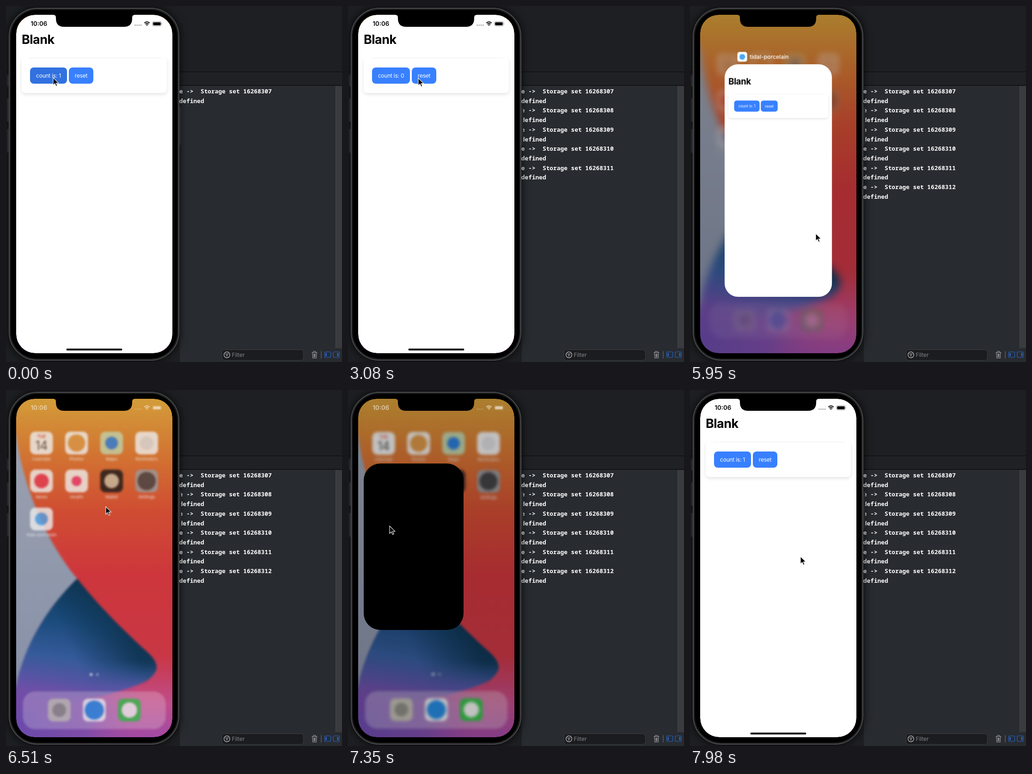
Animation, 727 px wide and 770 px high, one loop 8000 ms. Source, as an HTML page:

```html
<!DOCTYPE html>
<html lang="en">
<head>
<meta charset="utf-8">
<title>Counter app</title>
<style>
html, body { margin: 0; width: 100%; height: 100%; overflow: hidden; background: #1e1f22; }
#stage { position: relative; width: 727px; height: 770px; overflow: hidden; font-family: Inter, sans-serif; }
#stage div, #stage > svg, .screen svg { position: absolute; }
.anim { animation: 8s linear infinite; }
.step { animation: 8s step-end infinite; }

/* Editor behind the phone */
.console { left: 376px; top: 173px; width: 351px; height: 597px; background: #282b30; }
.tabs { left: 0; top: 142px; width: 727px; height: 28px; background: #202125; border: solid #08090a; border-width: 1.5px 0; }
.scrollbar { left: 713px; top: 173px; width: 14px; height: 567px; background: #3a3b3e; border-left: 1px solid #46474a; box-sizing: border-box; }
#log { left: 374.8px; top: 174px; width: 330px; overflow: hidden; white-space: pre; color: #fff;
  font: bold 12.83px/20.7px "Noto Sans Mono", monospace; animation-name: log; }
@keyframes log {
  0% { height: 41.4px; } 7% { height: 82.8px; } 13% { height: 124.2px; }
  19.25% { height: 165.6px; } 34% { height: 207px; } 48%, 100% { height: 248.4px; }
}

/* Phone */
.side { background: #3a3b3e; width: 4px; }
.phone { left: 6px; top: 4px; width: 369px; height: 763px; box-sizing: border-box; border-radius: 62px;
  background: #000; border: 2px solid #4b4c4e; box-shadow: 0 0 16px 4px rgba(0,0,0,.55), inset 0 0 0 2.5px #1b1b1d; }
.screen { left: 22px; top: 19px; width: 338px; height: 732px; border-radius: 40px; overflow: hidden; background: #000; }
.screen svg { left: 0; top: 0; width: 338px; height: 732px; overflow: visible; }

#wall { animation-name: wall; }
@keyframes wall {
  0%, 65% { filter: blur(9px) brightness(.52); }
  70%, 78.5% { filter: blur(9px) brightness(.75); }
  82.5%, 90% { filter: blur(0) brightness(1); }
  91.875% { filter: blur(2.5px) brightness(.76); }
  94.5%, 100% { filter: blur(9px) brightness(.6); }
}
#home { transform-origin: center; animation-name: home; }
@keyframes home {
  0%, 65% { opacity: 0; filter: blur(7px) brightness(.75); transform: scale(.945); }
  70%, 78.5% { opacity: .3; filter: blur(7px) brightness(.75); transform: scale(.945); }
  82.5%, 90% { opacity: 1; filter: blur(0) brightness(1); transform: none; }
  91.875% { opacity: 1; filter: blur(3px) brightness(.76); transform: scale(.982); }
  94.5%, 100% { opacity: .5; filter: blur(7px) brightness(.6); transform: scale(.95); }
}
#homeStatus { color: #fff; animation-name: homeStatus; }
@keyframes homeStatus {
  0%, 79.5% { opacity: 0; } 82.5%, 90% { opacity: .9; }
  91.875%, 95.5% { opacity: .6; } 97%, 100% { opacity: 0; }
}
#splash { background: #000; animation-name: splash; }
@keyframes splash {
  0%, 90% { left: 28px; top: 233px; width: 50px; height: 50px; border-radius: 12px; opacity: 0; }
  90.5% { opacity: 1; }
  91.875% { left: 12px; top: 141px; width: 215px; height: 358px; border-radius: 36px; }
  94.5%, 100% { left: 0; top: 0; width: 338px; height: 732px; border-radius: 40px; opacity: 1; }
}

/* App window */
#card { inset: 0; animation-name: card; }
@keyframes card {
  0%, 63.8% { transform: none; opacity: 1; }
  64.75% { transform: translateY(-2.5px) scale(.985); }
  67.5% { transform: translateY(-6px) scale(.76); }
  70%, 75.2% { transform: translateY(-7.5px) scale(.687); }
  79% { transform: translateY(-680px) scale(.687); opacity: 1; }
  79.01% { transform: translateY(-680px) scale(.687); opacity: 0; }
  79.02%, 95.2% { transform: none; opacity: 0; }
  97%, 100% { transform: none; opacity: 1; }
}
.app { inset: 0; background: #fff; border-radius: 42px; overflow: hidden; }
.chrome { color: #000; animation-name: chrome; }
@keyframes chrome { 0%, 65% { opacity: 1; } 69%, 79% { opacity: 0; } 80%, 100% { opacity: 1; } }
.title { left: 12px; top: 36px; font: 700 27px/36px Inter, sans-serif; letter-spacing: -.02em; color: #000; }
.content { left: 0; top: 93px; width: 338px; height: 140px; overflow: hidden; }
.panel { left: 12px; top: 0; width: 314px; height: 76px; border-radius: 8px; box-shadow: 0 3px 8px rgba(0,0,0,.11); }
.rule { left: 28px; top: 0; width: 286px; height: 1px; background: #efefef; }
.buttons { left: 30px; top: 21px; display: flex; gap: 4px; }
#stage .button { position: relative; height: 35px; border-radius: 8px; overflow: hidden; background: #3880ff; color: #fff;
  font: 400 12px/35px Inter, sans-serif; letter-spacing: -.02em; text-align: center; white-space: nowrap; }
#count { animation-name: countWidth, countPress; }
@keyframes countWidth { 0% { width: 80px; } 7% { width: 82px; } 48%, 100% { width: 80px; } }
@keyframes countPress {
  0%, 6.5%, 12.5%, 18.7%, 47.5% { background: #3171e0; }
  2.6%, 8.8%, 14.8%, 21%, 49.8%, 100% { background: #3880ff; }
}
#reset { width: 53px; animation-name: resetPress; }
@keyframes resetPress { 0% { background: #3880ff; } 33.5% { background: #3171e0; } 35.8%, 100% { background: #3880ff; } }
#reel { width: 100%; left: 0; top: 0; animation-name: reel; }
@keyframes reel {
  0% { transform: none; } 7% { transform: translateY(-35px); } 13% { transform: translateY(-70px); }
  19.25% { transform: translateY(-105px); } 34% { transform: translateY(-140px); } 48%, 100% { transform: none; }
}
.label { left: 40px; top: -39px; height: 31px; animation-name: label; }
.label i { position: absolute; width: 31px; height: 31px; border-radius: 7px;
  background: radial-gradient(circle, #4aa8f5 8.5px, #f4f8fc 9px); }
.label span { position: absolute; left: 38.6px; font: 500 17.8px/31px Inter, sans-serif; color: #fff; white-space: nowrap; }
@keyframes label { 0%, 67% { opacity: 0; } 71%, 79% { opacity: 1; } 79.5%, 100% { opacity: 0; } }

#cursor { left: 0; top: 0; width: 14px; height: 21px; overflow: visible; animation-name: cursor; }
@keyframes cursor {
  0%, 22% { transform: translate(102px, 155px); }
  28%, 39% { transform: translate(152px, 156px); }
  45%, 51% { transform: translate(104px, 154px); }
  59%, 62.8% { transform: translate(150px, 742px); }
  64.75% { transform: translate(157px, 621px); }
  67.5% { transform: translate(190px, 470px); }
  70% { transform: translate(225px, 455px); }
  74.375%, 75% { transform: translate(272px, 492px); }
  78.2% { transform: translate(250px, 235px); }
  80.5% { transform: translate(228px, 240px); }
  85.75% { transform: translate(156px, 313px); }
  88.5%, 91.875% { transform: translate(90px, 294px); }
  93% { transform: translate(94px, 296px); }
  98.5%, 100% { transform: translate(239px, 360px); }
}
</style>
</head>
<body>
<div id="stage">
  <div class="tabs"></div>
  <div class="console"></div>
  <div class="scrollbar"></div>
  <div id="log" class="step"></div>

  <svg width="727" height="770" fill="none">
    <rect x="467.5" y="743.5" width="176" height="23" rx="6" fill="#1b1c1f" stroke="#3b3c40"/>
    <g stroke="#c9c9cb" stroke-width="1.2">
      <circle cx="478" cy="754.5" r="6.3"/>
      <path d="M474.5 752.5h7M475.8 755h4.4M477 757.4h2"/>
    </g>
    <text x="488.5" y="759" font-size="11.8" fill="#85868a">Filter</text>
    <g stroke="#9b9c9f" stroke-width="1.1">
      <path d="M661.5 749.5h12M665 749v-2h5v2M663 750l.8 11.5h7.4l.8-11.5M665.8 752l.3 7.5M667.5 752v7.5M669.2 752l-.3 7.5"/>
      <path d="M682 746.5v16" stroke="#6c6d70"/>
    </g>
    <g stroke="#2864c0" stroke-width="1.2">
      <rect x="689.5" y="748" width="13" height="12" rx="2"/><rect x="708" y="748" width="13" height="12" rx="2"/>
      <path d="M692.7 750.5v7M717.8 750.5v7" stroke-width="2.6"/>
    </g>
  </svg>

  <div class="side" style="left:2px;top:150px;height:24px"></div>
  <div class="side" style="left:2px;top:200px;height:50px"></div>
  <div class="side" style="left:2px;top:266px;height:51px"></div>
  <div class="side" style="left:375px;top:218px;height:82px"></div>
  <div class="phone"></div>

  <div class="screen">
    <svg id="wall" class="anim" viewBox="22 19 338 732">
      <defs>
        <linearGradient id="sunset" gradientUnits="userSpaceOnUse" x1="0" y1="19" x2="0" y2="751">
          <stop offset="0" stop-color="#e3a83d"/><stop offset=".17" stop-color="#e27b36"/>
          <stop offset=".33" stop-color="#df5336"/><stop offset=".52" stop-color="#dc3a40"/>
          <stop offset=".76" stop-color="#d83b4a"/><stop offset=".9" stop-color="#cf5295"/>
          <stop offset="1" stop-color="#ae50b0"/>
        </linearGradient>
        <linearGradient id="mist" x1="0" y1="0" x2="0" y2="1">
          <stop offset="0" stop-color="#a9afbd"/><stop offset="1" stop-color="#8e99b4"/>
        </linearGradient>
        <linearGradient id="sea" gradientUnits="userSpaceOnUse" x1="200" y1="430" x2="160" y2="695">
          <stop offset="0" stop-color="#123f63"/><stop offset=".3" stop-color="#1d5085"/>
          <stop offset=".6" stop-color="#3a62a6"/><stop offset=".8" stop-color="#6159b0"/>
          <stop offset="1" stop-color="#7b56b6" stop-opacity="0"/>
        </linearGradient>
        <linearGradient id="shade" gradientUnits="userSpaceOnUse" x1="150" y1="580" x2="270" y2="530">
          <stop offset="0" stop-color="#0d3552" stop-opacity="0"/><stop offset="1" stop-color="#0d3552" stop-opacity=".85"/>
        </linearGradient>
        <linearGradient id="fade" gradientUnits="userSpaceOnUse" x1="0" y1="585" x2="0" y2="640">
          <stop offset="0" stop-color="#fff"/><stop offset="1"/>
        </linearGradient>
        <mask id="upper"><rect y="350" width="400" height="400" fill="url(#fade)"/></mask>
        <radialGradient id="violet" gradientUnits="userSpaceOnUse" cx="40" cy="720" r="270">
          <stop offset="0" stop-color="#7350b8"/><stop offset=".5" stop-color="#8353b6" stop-opacity=".9"/>
          <stop offset="1" stop-color="#b850a8" stop-opacity="0"/>
        </radialGradient>
      </defs>
      <rect x="-30" y="-30" width="440" height="840" fill="url(#sunset)"/>
      <rect x="-30" y="440" width="440" height="370" fill="url(#violet)"/>
      <path d="M-20 20L22 98C38 215 90 332 154 408C90 470 40 550 22 640L-20 720Z" fill="url(#mist)"/>
      <g id="wave">
        <path id="wavePath" d="M154 408C205 473 265 530 305 566C325 584 329 598 324 608C315 632 270 645 200 664C130 682 70 694 -20 700V720L22 640C40 550 90 470 154 408Z" fill="url(#sea)"/>
        <use href="#wavePath" style="display:none"/>
        <path d="M154 408C205 473 265 530 305 566C325 584 329 598 324 608L300 640H22V640C40 550 90 470 154 408Z" fill="url(#shade)" mask="url(#upper)"/>
      </g>
    </svg>

    <svg id="home" class="anim" viewBox="22 19 338 732" text-anchor="middle">
      <rect x="34" y="656" width="314" height="83" rx="27" fill="#fff" opacity=".3"/>
      <circle cx="184" cy="619" r="3" fill="#fff"/><circle cx="198" cy="619" r="3" fill="#fff" opacity=".5"/>
      <g id="icons"></g>
      <text x="75" y="99" font-size="9.5" font-weight="600" fill="#d8392f">TUE</text>
      <text x="74.5" y="126" font-size="28" font-weight="300" letter-spacing="-1" fill="#222">14</text>
    </svg>

    <div id="splash" class="anim"></div>
    <svg id="homeStatus" class="anim" viewBox="22 19 338 732"><use href="#status"/></svg>

    <div id="card" class="anim">
      <div class="label anim"><i></i><span>tidal-porcelain</span></div>
      <div class="app">
        <svg class="chrome anim" viewBox="22 19 338 732">
          <g id="status" fill="currentColor">
            <text x="53.5" y="43" font-size="13.2" font-weight="600">10:06</text>
            <g opacity=".35"><circle cx="279.5" cy="41.5" r="1.4"/><circle cx="283.7" cy="41.5" r="1.4"/><circle cx="287.9" cy="41.5" r="1.4"/><circle cx="292.1" cy="41.5" r="1.4"/></g>
            <path d="M299.3 36.8Q305 31.6 310.7 36.8M301.5 39.2Q305 36.2 308.5 39.2" fill="none" stroke="currentColor" stroke-width="1.9"/>
            <path d="M303 40.8Q305 39.4 307 40.8L305 43Z"/>
            <rect x="316.7" y="33.7" width="19.6" height="9.6" rx="3" fill="none" stroke="currentColor" stroke-opacity=".4"/>
            <rect x="318.2" y="35.2" width="16.6" height="6.6" rx="1.7"/>
            <path d="M337.4 36.8q1.6 1.7 0 3.4z" opacity=".5"/>
          </g>
          <rect x="130.5" y="741" width="121" height="4" rx="2"/>
        </svg>
        <div class="title">Blank</div>
        <div class="content">
          <div class="panel"></div>
          <div class="rule"></div>
          <div class="buttons">
            <div id="count" class="button step"><div id="reel" class="step"></div></div>
            <div id="reset" class="button step">reset</div>
          </div>
        </div>
      </div>
    </div>
  </div>

  <svg width="727" height="60"><path d="M102 18V19Q108 19 108 25V27Q108 45 126 45H255Q273 45 273 27V25Q273 19 279 19V18Z"/></svg>
  <svg id="cursor" class="anim" viewBox="0 0 14 21">
    <path d="M0 0V16.2L3.8 12.7L6.4 18.6L9 17.5L6.4 11.7H11.6Z" stroke="#fff" stroke-width="1.1"/>
  </svg>
</div>
<script>
const byId = id => document.getElementById(id);

byId('log').textContent = Array.from({ length: 6 },
  (_, i) => `e ->  Storage set ${16268307 + i}\ndefined`).join('\n');

byId('reel').innerHTML = [1, 2, 3, 4, 0].map(n => `count is: ${n}<br>`).join('');

// name, tile colour, mark colour, mark radius
const apps = [
  ['Calendar', '#fff'],
  ['Photos', '#fff', '#e8a04c', 19],
  ['Maps', '#cfe0b4', '#2f86e8', 14],
  ['Reminders', '#fff', '#e9e9ec', 15],
  ['News', '#fff', '#f2405c', 16],
  ['Health', '#fff', '#f8447c', 11],
  ['Wallet', '#1c1c1e', '#d3c8ae', 16],
  ['Settings', '#a4a5a9', '#47484c', 20],
  ['tidal-porcelain', '#fff', '#55b0fa', 14]
];
const dock = [['', '#cdcabf', '#98968d', 15], ['', '#fff', '#2a94ee', 21], ['', '#3acb4e', '#fff', 17]];

const icon = ([name, tile, mark, r], x, y) => `
  <rect x="${x - 25}" y="${y - 25}" width="50" height="50" rx="11.5" fill="${tile}"/>
  ${mark ? `<circle cx="${x}" cy="${y}" r="${r}" fill="${mark}"/>` : ''}
  <text x="${x}" y="${y + 38.5}" font-size="9.6" font-weight="500" fill="#fff">${name}</text>`;

byId('icons').innerHTML =
  apps.map((app, i) => icon(app, 75 + i % 4 * 77, 110.5 + Math.floor(i / 4) * 83.4)).join('') +
  dock.map((app, i) => icon(app, 114 + i * 77, 697)).join('');
</script>
</body>
</html>
```
